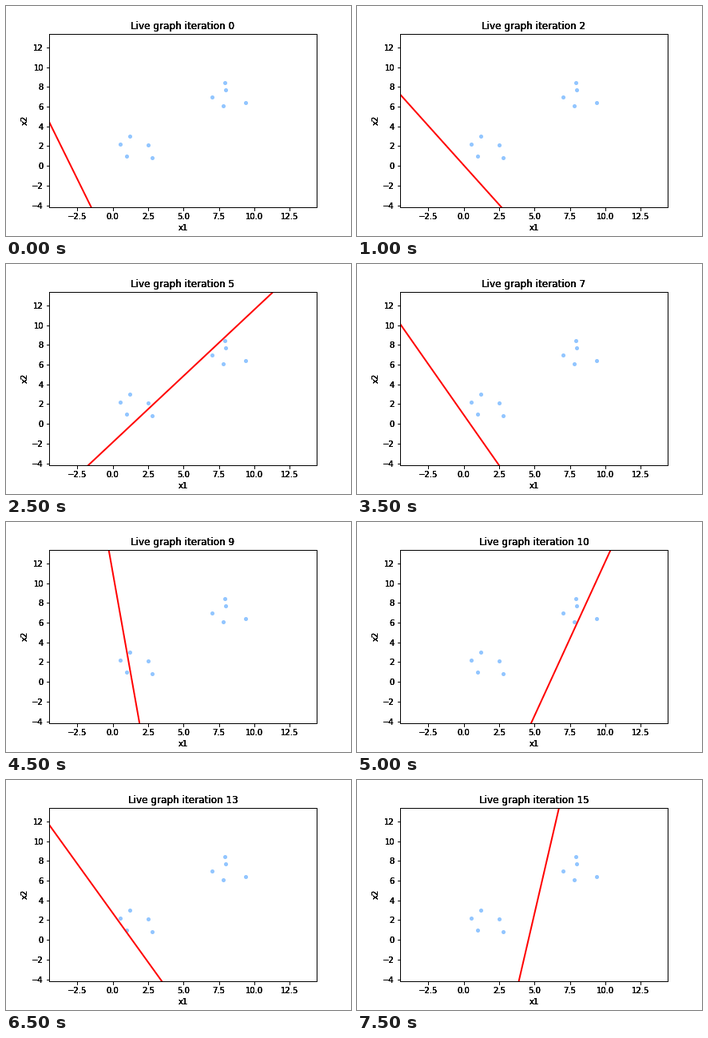
A matplotlib script that plays this animation: 432 px wide and 288 px high, repeating every 8 s.

```python
import matplotlib.pyplot as plt
import numpy as np
from matplotlib.animation import FuncAnimation

FRAMES, INTERVAL = 16, 500
LAYERS = 4  # stacked copies of the axes text make its edges crisp and dark

POINTS = np.array([
    (1.0, 1.0), (9.4, 6.4), (2.5, 2.1), (8.0, 7.7), (0.5, 2.2),
    (7.9, 8.4), (7.0, 7.0), (2.8, 0.8), (1.2, 3.0), (7.8, 6.1),
])
LABELS = np.where(POINTS.sum(axis=1) < 8, 1, -1)
START_WEIGHTS = np.array([0.0785, 0.027, 0.233])
X_LIM = POINTS[:, 0].min() - 5, POINTS[:, 0].max() + 5
Y_LIM = POINTS[:, 1].min() - 5, POINTS[:, 1].max() + 5


def perceptron_history(count):
    """Weights at the start and after each correction, cycling the samples."""
    samples = np.column_stack([POINTS, np.ones(len(POINTS))])
    weights = START_WEIGHTS.copy()
    history = [weights.copy()]
    i = 0
    while len(history) < count:
        sample, label = samples[i % len(samples)], LABELS[i % len(samples)]
        if label * (weights @ sample) <= 0:
            weights += label * sample
            history.append(weights.copy())
        i += 1
    return history


def make_axes(fig, opaque):
    ax = fig.add_axes([0.125, 0.125, 0.775, 0.755])
    ax.set_facecolor("white" if opaque else "none")
    ax.set(xlim=X_LIM, ylim=Y_LIM, xlabel="x1", ylabel="x2",
           xticks=np.arange(-2.5, 13, 2.5), yticks=np.arange(-4, 13, 2))
    return ax


plt.rcParams.update({"font.family": "DejaVu Sans", "font.size": 10})
fig = plt.figure(figsize=(6, 4), dpi=72, facecolor="white")
layers = [make_axes(fig, opaque=(k == 0)) for k in range(LAYERS)]
plot = layers[0]
plot.plot(*POINTS.T, "o", color="#92C6FF", markersize=4, zorder=1)
boundary, = plot.plot([], [], color="red", linewidth=2, zorder=2)
titles = [ax.set_title("") for ax in layers]
history = perceptron_history(FRAMES)


def update(frame):
    w1, w2, bias = history[frame]
    xs = np.array([-30.0, 40.0])
    boundary.set_data(xs, -(w1 * xs + bias) / w2)
    for title in titles:
        title.set_text(f"Live graph iteration {frame}")
    return [boundary, *titles]


anim = FuncAnimation(fig, update, frames=FRAMES, interval=INTERVAL,
                     repeat=True, repeat_delay=0)
plt.show()
```
